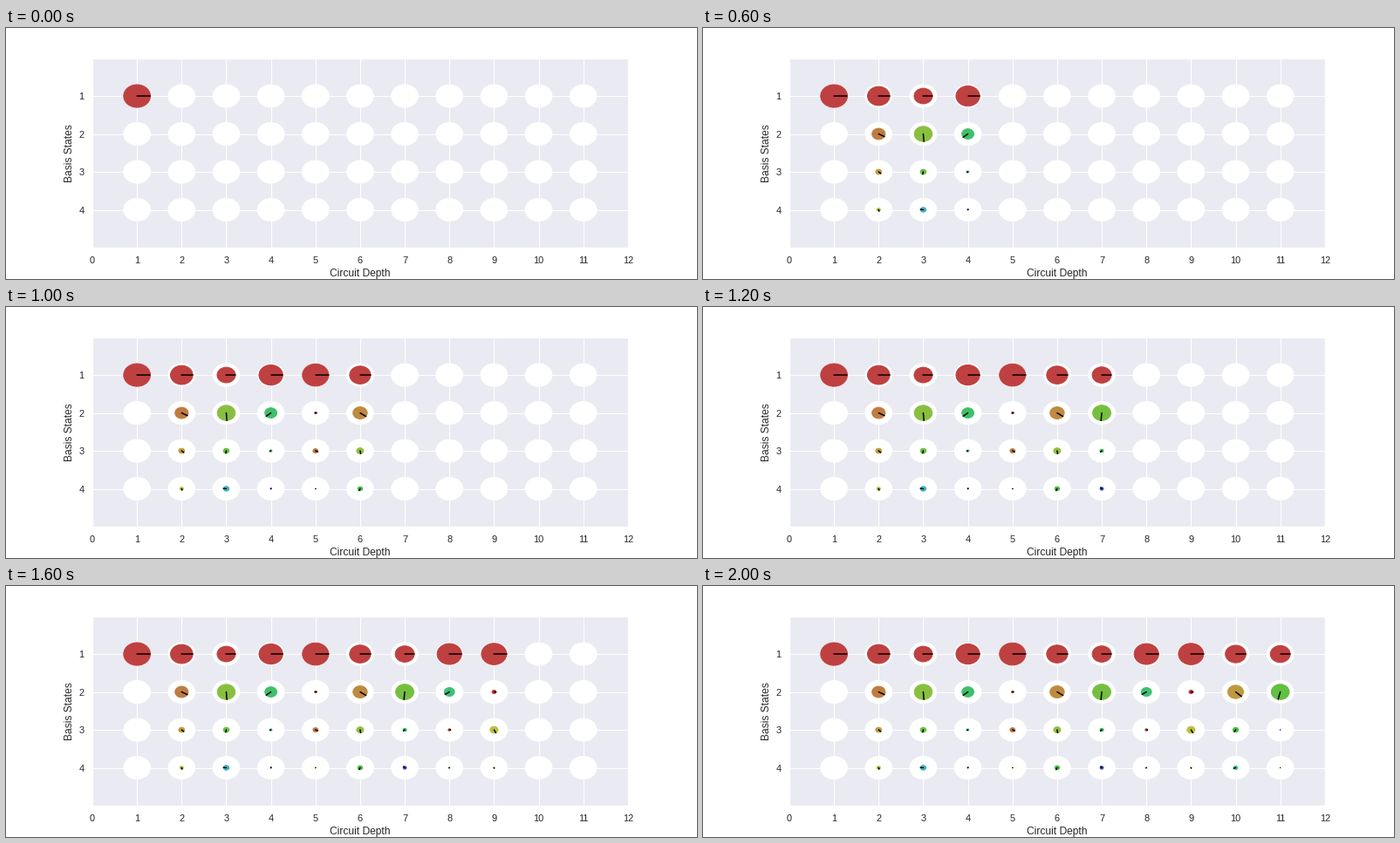
Write a matplotlib script that moves like this. It is 792x288 px and loops after 2200 ms.

```python
import colorsys

import numpy as np
import matplotlib.pyplot as plt
from matplotlib.animation import FuncAnimation
from matplotlib.patches import Circle

STEPS, ROWS, RADIUS = 11, 4, 0.3
INK = "0.15"

plt.rcParams.update({
    "font.family": "Liberation Sans",
    "axes.facecolor": "#EAEAF2",
    "axes.edgecolor": "white",
    "axes.linewidth": 1.25,
    "axes.labelcolor": INK,
    "axes.labelsize": 12,
    "axes.axisbelow": True,
    "xtick.labelsize": 11,
    "ytick.labelsize": 11,
    "xtick.color": INK,
    "ytick.color": INK,
    "xtick.major.size": 6,
    "ytick.major.size": 6,
    "xtick.bottom": False,
    "ytick.left": False,
    "grid.color": "white",
    "grid.linewidth": 1,
    "grid.linestyle": "-",
})


def qubit(n, half_angle, tilt, offset):
    """Amplitudes of |0> and |1> after n turns about a tilted axis."""
    a = np.radians(half_angle) * n
    zero = np.cos(a) - 1j * np.sqrt(1 - tilt ** 2) * np.sin(a)
    one = tilt * np.sin(a) * np.exp(1j * np.radians(offset))
    return zero, one


def state(n):
    """Two-qubit product state, with the first amplitude made real."""
    a0, a1 = qubit(n, 46.65, 0.70, -8.7)
    b0, b1 = qubit(n, 54.05, 0.315, -9)
    amps = np.array([a0 * b0, a1 * b0, a0 * b1, a1 * b1])
    amps = amps * np.exp(-1j * np.angle(amps[0]))
    amps[0] = abs(amps[0])
    return amps


def draw_amplitude(x, y, amp):
    r = RADIUS * abs(amp)
    if r == 0:
        return []
    phase = np.angle(amp)
    color = colorsys.hls_to_rgb(phase / (2 * np.pi) % 1, 0.5, 0.5)
    disc = ax.add_patch(Circle((x, y), r, color=color, lw=1))
    hand, = ax.plot([x, x + r * np.cos(phase)], [y, y + r * np.sin(phase)],
                    color="black", lw=1.5, solid_capstyle="round")
    return [disc, hand]


fig = plt.figure(figsize=(11, 4), dpi=72, facecolor="white")
ax = fig.add_axes([0.125, 0.125, 0.775, 0.755])
ax.set_xlim(0, STEPS + 1)
ax.set_ylim(ROWS + 1, 0)
ax.set_autoscale_on(False)
ax.set_xticks(range(STEPS + 2))
ax.set_yticks(range(1, ROWS + 1))
ax.grid(True)
ax.set_xlabel("Circuit Depth")
ax.set_ylabel("Basis States")

for col in range(1, STEPS + 1):
    for row in range(1, ROWS + 1):
        ax.add_patch(Circle((col, row), RADIUS, color="white", lw=1))

columns = []
for n in range(STEPS):
    parts = []
    for row, amp in enumerate(state(n), 1):
        parts += draw_amplitude(n + 1, row, amp)
    columns.append(parts)


def update(frame):
    for n, parts in enumerate(columns):
        for part in parts:
            part.set_visible(n <= frame)
    return []


anim = FuncAnimation(fig, update, frames=STEPS, interval=200,
                     init_func=lambda: update(0), repeat=True,
                     repeat_delay=0, blit=False)
plt.show()
```
